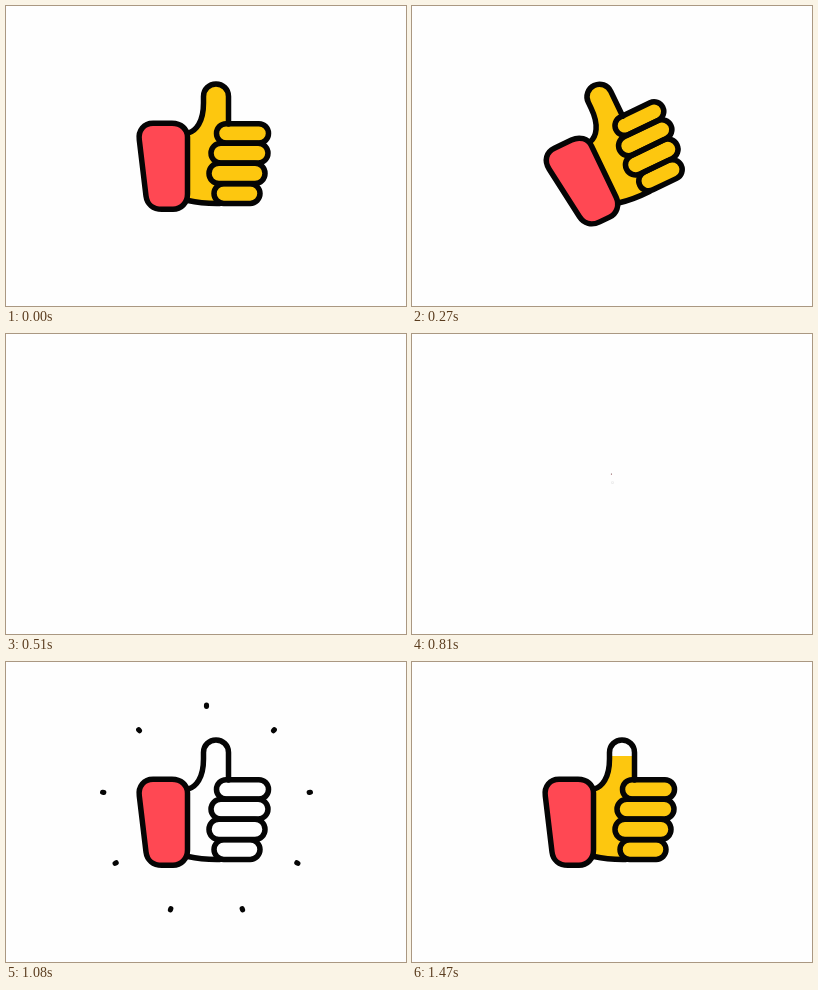
Recreate the animation shown at these times as an HTML page. Size 400 px wide and 300 px high, loop 1.5 s.

```html
<!DOCTYPE html>
<html lang="en">
<head>
<meta charset="utf-8">
<title>Thumbs up</title>
<style>
  html, body { margin: 0; width: 100%; height: 100%; overflow: hidden; background: #fefefe; }
  svg { display: block; width: 100vw; height: 100vh; }
</style>
</head>
<body>
<svg viewBox="0 0 400 300">
  <defs>
    <path id="palm" d="M182 127C190 125 197.5 116 197.5 97V90.4a12.5 12.5 0 0 1 25 0V118L215 127L211 197Q196 197.5 182 194.5Z"/>
    <g id="fingers">
      <rect id="f1" x="210.5" y="117.7" width="52" height="19.3" rx="9.6"/>
      <rect id="f2" x="205" y="137.2" width="57" height="19.8" rx="9.9"/>
      <rect id="f3" x="203" y="157.2" width="56" height="20.3" rx="10"/>
      <rect id="f4" x="208" y="177.7" width="46" height="19.7" rx="9.8"/>
    </g>
    <clipPath id="skin">
      <use href="#palm"/>
      <use href="#f1"/><use href="#f2"/><use href="#f3"/><use href="#f4"/>
    </clipPath>
  </defs>
  <g id="dots" stroke="#050505" stroke-linecap="round"></g>
  <g id="hand" stroke="#050505" stroke-width="5.5" stroke-linecap="round" stroke-linejoin="round" fill="none">
    <g clip-path="url(#skin)" stroke="none">
      <rect x="170" y="70" width="100" height="135" fill="#fefefe"/>
      <rect id="fill" x="170" width="100" fill="#fdc70f"/>
    </g>
    <path d="M182 127C190 125 197.5 116 197.5 97V90.4a12.5 12.5 0 0 1 25 0V118"/>
    <path d="M182 194.5Q196 197.7 214 197.4"/>
    <use href="#fingers"/>
    <path fill="#ff4853" d="M147 117.3H166C175 117.3 181.5 123 181.5 131V188C181.5 197 175 203.3 167 203.3H156C147 203.3 141 198 140 190L133.3 134C132 124 138 117.3 147 117.3Z"/>
  </g>
</svg>
<script>
const LOOP = 1500, STEP = 30, DOTS = 9;
const $ = id => document.getElementById(id);
const hand = $("hand"), dots = $("dots"), fill = $("fill");

const progress = (t, a, b) => Math.min(1, Math.max(0, (t - a) / (b - a)));
const smooth = p => p * p * (3 - 2 * p);

const rays = Array.from({ length: DOTS }, (_, i) => {
  const ray = document.createElementNS("http://www.w3.org/2000/svg", "line");
  ray.setAttribute("transform", `rotate(${i * 360 / DOTS})`);
  return dots.appendChild(ray);
});

function place(el, x, y, scale, angle = 0, ox = 0, oy = 0) {
  el.style.display = scale > 0.004 ? "" : "none";
  el.setAttribute("transform",
    `translate(${x} ${y}) rotate(${angle}) scale(${scale}) translate(${-ox} ${-oy})`);
}

function draw(t) {
  const leaving = t < 660;
  const grow = smooth(progress(t, 795, 1058));
  const scale = leaving ? 1 - smooth(progress(t, 270, 508)) : grow;
  const angle = leaving ? -0.095 * Math.min(t, 272) : -11 * (1 - grow);
  place(hand, 199.5, 140, scale, angle, 199.5, 140);

  const level = leaving ? 70 : Math.min(205, 187 - (t - 1200) * 0.3444);
  fill.setAttribute("y", level);
  fill.setAttribute("height", 205 - level);

  // burst: travels with the hand's growth, then shrinks away
  const fade = progress(t, 1050, 1150);
  place(dots, 200.5, 148.6, leaving || fade === 1 ? 0 : grow);
  const half = 0.9 * (1 - fade), r = 104 + 3 * fade;
  for (const ray of rays) {
    ray.setAttribute("y1", -r - half);
    ray.setAttribute("y2", -r + half);
    ray.setAttribute("stroke-width", 7.3 * (1 - fade));
  }
}

const start = performance.now();
function tick() {
  const t = (performance.now() - start) % LOOP;
  draw(Math.floor(t / STEP) * STEP);
  requestAnimationFrame(tick);
}
tick();
</script>
</body>
</html>
```
